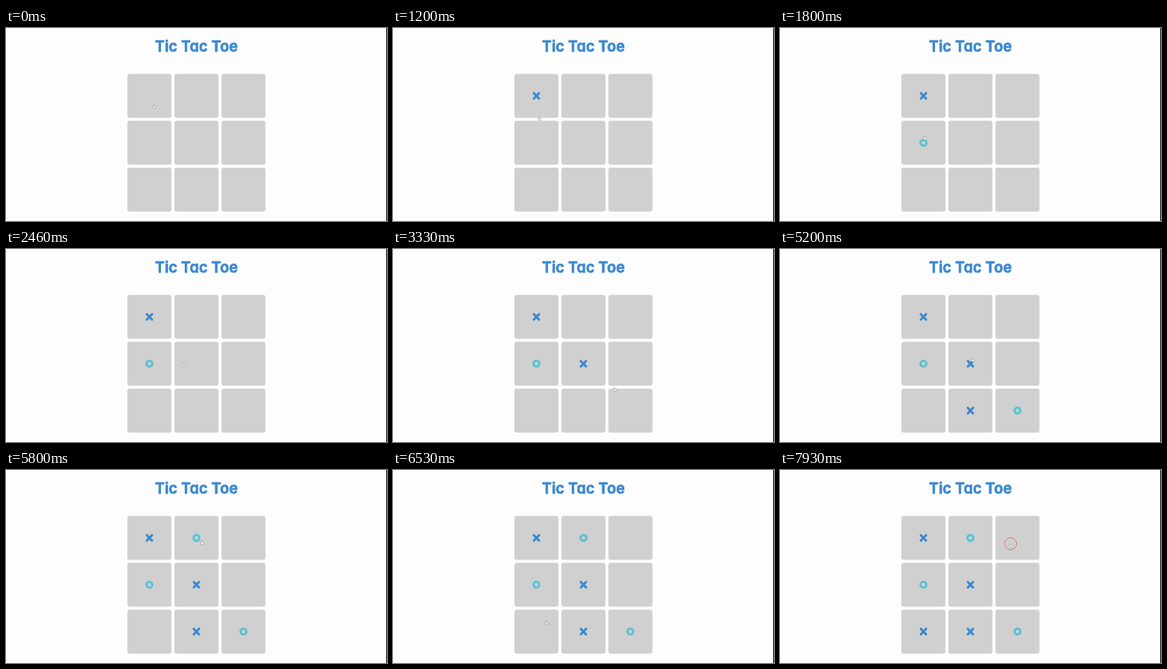
Write an HTML page that moves like this. It is 484 px wide and 246 px high and loops after 8000 ms.

```html
<!DOCTYPE html>
<html lang="en">
<head>
<meta charset="utf-8">
<title>Tic Tac Toe</title>
<style>
  html, body { margin: 0; height: 100%; overflow: hidden; background: #fdfdfd; }
  svg { display: block; }
  .title {
    font: 600 18.5px Inter, "Open Sans", sans-serif;
    font-feature-settings: "cv11";
    letter-spacing: .2px;
    fill: #3b88d0; stroke: #3b88d0; stroke-width: .8; stroke-linejoin: round;
    text-anchor: middle;
  }
  .cell { fill: #d0d0d0; }
  .x, .o { fill: none; stroke-width: 2.9; stroke-linecap: round; }
  .x { stroke: #3b88d0; }
  .o { stroke: #5bc2d2; }
  .cursor { fill: #fff; stroke: #8a8a8a; stroke-width: .6; }
  .ring { fill: none; stroke: #dc7b76; }
</style>
</head>
<body>
<svg width="484" height="246" viewBox="0 0 484 246">
  <text class="title" x="242" y="30">Tic Tac Toe</text>
  <path d="M483.5 0V246" stroke="#111"/>
  <g id="board"></g>
  <g id="pointer">
    <circle id="ring" class="ring" r="7.6"/>
    <path class="cursor" d="M-.9 .3Q-.3 -.2 .2 .5V1.5L1.7 1.9Q2.3 2.3 2 3.2L1.4 4.6H-.9L-2.1 2.9Q-2 2.2 -.9 2.5Z"/>
  </g>
</svg>
<script>
const TICK = 1000 / 15, TICKS = 120;
const SIZE = 56, PITCH = 59.7, LEFT = 154.2, TOP = 58.5;
const MOVE = 6, PRESS = 3, MARK_DELAY = 2; // in ticks

const start = { x: 188, y: 98 };
// Each stop: the tick the pointer sets off, where it goes, when it clicks there
const stops = [
  { leave: 2, x: 188, y: 95, click: 11 },
  { leave: 17, x: 184, y: 138, click: 24 },
  { leave: 31, x: 226, y: 144.5 },
  { leave: 37, x: 245, y: 136, click: 45 },
  { leave: 48, x: 297, y: 194, click: 54 },
  { leave: 57, x: 249, y: 202, click: 68 },
  { leave: 71, x: 245, y: 139 },
  { leave: 78, x: 249, y: 90, click: 84 },
  { leave: 89, x: 195, y: 192, click: 103 },
  { leave: 112, x: 293, y: 94, click: 119 }
];
const clicks = stops.filter(stop => stop.click);

const $ = id => document.getElementById(id);
const show = (el, on) => el.setAttribute("visibility", on ? "visible" : "hidden");
const easeOut = p => 1 - (1 - p) ** 3;

function add(tag, attrs) {
  const el = document.createElementNS("http://www.w3.org/2000/svg", tag);
  for (const key in attrs) el.setAttribute(key, attrs[key]);
  return $("board").appendChild(el);
}

for (let i = 0; i < 9; i++) {
  add("rect", {
    class: "cell", rx: 3, width: SIZE, height: SIZE,
    x: LEFT + i % 3 * PITCH, y: TOP + Math.floor(i / 3) * PITCH
  });
}

// Centre of the cell under a position, along one axis
const centre = (pos, origin) => origin + Math.floor((pos - origin) / PITCH) * PITCH + SIZE / 2;

const marks = clicks.map((stop, i) => {
  const x = centre(stop.x, LEFT), y = centre(stop.y, TOP);
  return i % 2
    ? add("circle", { class: "o", cx: x, cy: y, r: 3.7 })
    : add("path", { class: "x", d: `M${x - 3.3} ${y - 3.5}l6.6 7m0-7l-6.6 7` });
});

function pointerAt(tick) {
  let { x, y } = start;
  for (const stop of stops) {
    if (tick <= stop.leave) break;
    const e = easeOut(Math.min(1, (tick - stop.leave) / MOVE));
    x += (stop.x - x) * e;
    y += (stop.y - y) * e;
  }
  return { x, y };
}

function draw(now) {
  const tick = Math.floor((now + 7) / TICK) % TICKS;
  const { x, y } = pointerAt(tick);
  $("pointer").setAttribute("transform", `translate(${x} ${y})`);
  show($("ring"), clicks.some(({ click }) => tick >= click && tick < click + PRESS));
  marks.forEach((mark, i) => show(mark, tick >= clicks[i].click + MARK_DELAY));
}

const began = performance.now();
function loop() {
  draw(performance.now() - began);
  requestAnimationFrame(loop);
}
loop();
</script>
</body>
</html>
```
